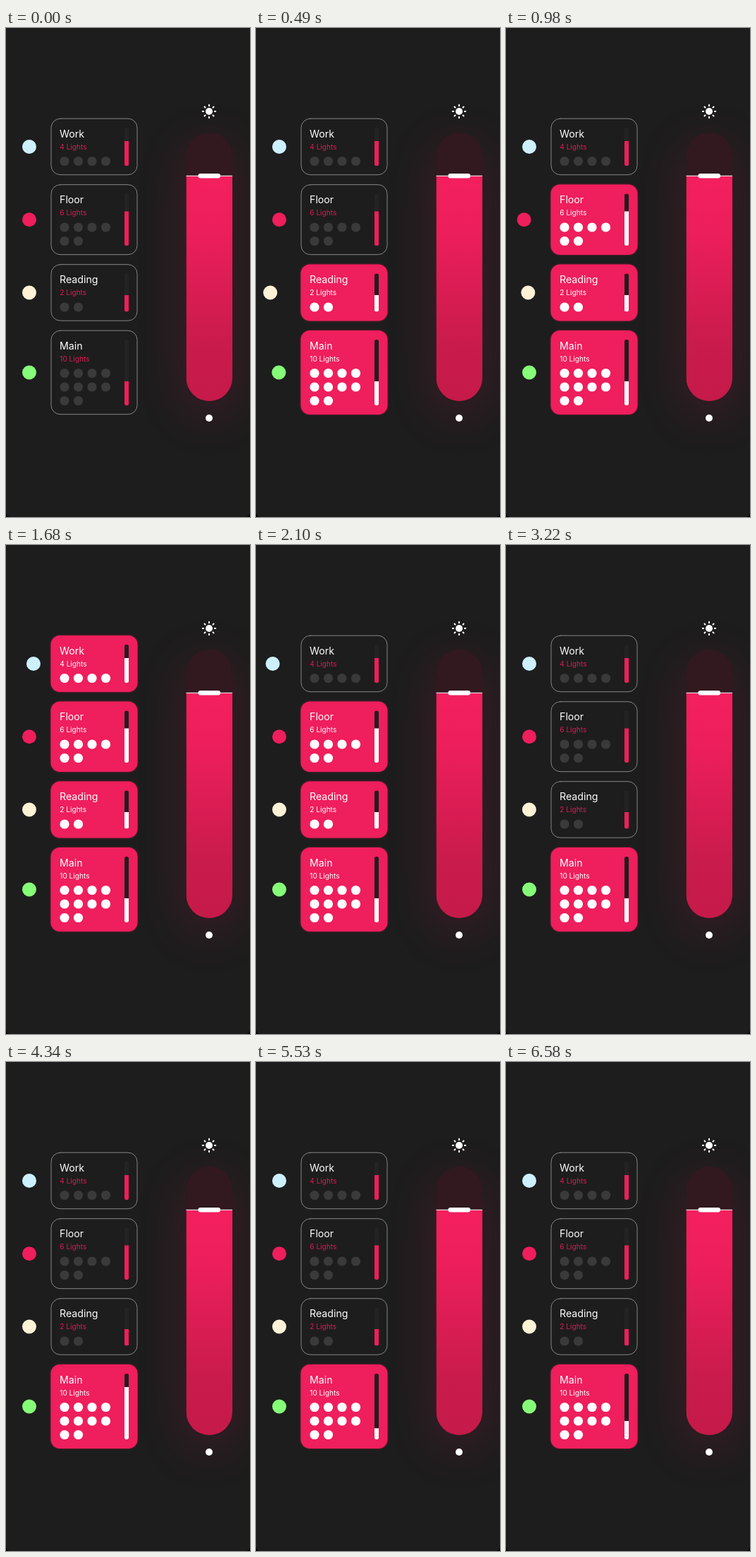
An HTML page with a canvas for the animation above (6.65 s loop, 346x692 px).

```html
<!DOCTYPE html>
<html lang="en">
<head>
<meta charset="utf-8">
<title>Light controls</title>
<style>
  html, body { margin: 0; width: 100%; height: 100%; overflow: hidden; background: #000; }
  canvas { display: block; width: 346px; height: 692px; }
</style>
</head>
<body>
<canvas id="stage"></canvas>
<script>
const W = 346, H = 692, LOOP = 6650, STEP = 70;
const BG = '#1d1d1d', PINK = '#ef1e5c', WHITE = '#fff';
const canvas = document.getElementById('stage');
const ctx = canvas.getContext('2d');
const dpr = window.devicePixelRatio || 1;
canvas.width = W * dpr;
canvas.height = H * dpr;
ctx.scale(dpr, dpr);

// on / off: tap times in ms
const cards = [
  { name: 'Work', lights: 4, top: 128, h: 80, level: 160, dot: '#cdf0ff', on: 1482, off: 2018 },
  { name: 'Floor', lights: 6, top: 221.5, h: 99.5, level: 259.5, dot: PINK, on: 890, off: 2444 },
  { name: 'Reading', lights: 2, top: 334.5, h: 80, level: 378, dot: '#fdf1d6', on: 438, off: 2870 },
  { name: 'Main', lights: 10, top: 428, h: 119, level: 500, dot: '#86fd78', on: 12, off: Infinity }
];

// Drag of the Main bar: [time, top edge]
const drag = [[3640, 500], [4340, 460], [4760, 460], [5390, 520], [5460, 520], [6160, 452], [6650, 511]];

function dragLevel(t) {
  if (t <= drag[0][0]) return drag[0][1];
  const i = drag.findIndex(p => p[0] >= t);
  const [t0, y0] = drag[i - 1], [t1, y1] = drag[i];
  const u = (t - t0) / (t1 - t0);
  return y0 + (y1 - y0) * (1 - Math.cos(Math.PI * u)) / 2;
}

// Damped shake after a tap
function shake(dt) {
  if (dt <= 0 || dt >= 690) return 0;
  return -16 * Math.exp(-dt / 250) * Math.sin(Math.PI * dt / 117);
}

function circle(x, y, r, color) {
  ctx.fillStyle = color;
  ctx.beginPath();
  ctx.arc(x, y, r, 0, 2 * Math.PI);
  ctx.fill();
}

function roundPath(x, y, w, h, r) {
  ctx.beginPath();
  ctx.roundRect(x, y, w, h, r);
}

function pill(x, y, w, h, r, color) {
  ctx.fillStyle = color;
  roundPath(x, y, w, h, r);
  ctx.fill();
}

function label(str, x, y, size, color) {
  ctx.font = `400 ${size}px Inter, sans-serif`;
  ctx.fillStyle = color;
  ctx.fillText(str, x, y);
}

function filledBar(x, y, w, h, r, level, back, front) {
  ctx.save();
  roundPath(x, y, w, h, r);
  ctx.clip();
  ctx.fillStyle = back;
  ctx.fillRect(x, y, w, h);
  ctx.fillStyle = front;
  ctx.fillRect(x, level, w, y + h - level);
  ctx.restore();
}

function drawCard(c, t) {
  const on = t > c.on && t <= c.off;
  const tap = t > c.off ? c.off : c.on;
  circle(33 + shake(t - tap), c.top + c.h / 2, 10, c.dot);

  if (on) {
    ctx.save();
    ctx.shadowColor = 'rgba(239,30,92,.5)';
    ctx.shadowBlur = 3 * dpr;
    pill(63.5, c.top, 123, c.h, 13, PINK);
    ctx.restore();
  } else {
    ctx.strokeStyle = '#858585';
    ctx.lineWidth = 1;
    roundPath(64, c.top + 0.2, 122, c.h - 0.5, 13);
    ctx.stroke();
  }

  label(c.name, 76, c.top + 26.5, 14.2, WHITE);
  label(c.lights + ' Lights', 76.3, c.top + 43.6, 10.1, on ? WHITE : '#d81c54');
  for (let i = 0; i < c.lights; i++) {
    const x = 83 + 19.5 * (i % 4), y = c.top + 60.5 + 19.5 * Math.floor(i / 4);
    circle(x, y, 6.6, on ? WHITE : '#3a3a3a');
  }

  const level = c.name === 'Main' ? dragLevel(t) : c.level;
  filledBar(168, c.top + 13, 6, c.h - 26, 2.5, level, on ? '#211b1d' : '#232323', on ? WHITE : PINK);
}

function drawSun(x, y) {
  circle(x, y, 5, WHITE);
  ctx.strokeStyle = WHITE;
  ctx.lineWidth = 2;
  ctx.lineCap = 'round';
  for (let i = 0; i < 8; i++) {
    const a = i * Math.PI / 4, cx = Math.cos(a), sy = Math.sin(a);
    ctx.beginPath();
    ctx.moveTo(x + 7.8 * cx, y + 7.8 * sy);
    ctx.lineTo(x + 9.2 * cx, y + 9.2 * sy);
    ctx.stroke();
  }
}

function drawSlider() {
  const x = 255.5, y = 148, w = 65.5, h = 380, r = 32.75, level = 209;
  ctx.save();
  ctx.shadowColor = 'rgba(240,30,92,.18)';
  ctx.shadowBlur = 70 * dpr;
  ctx.shadowOffsetY = 18 * dpr;
  pill(x, y, w, h, r, BG);
  ctx.restore();

  const grad = ctx.createLinearGradient(0, level, 0, y + h);
  grad.addColorStop(0, '#f41f5e');
  grad.addColorStop(0.25, '#ec1e5b');
  grad.addColorStop(0.75, '#c91b4c');
  grad.addColorStop(1, '#c51a4a');
  filledBar(x, y, w, h, r, level, '#31191f', grad);

  ctx.fillStyle = WHITE;
  ctx.fillRect(x, level - 0.2, w, 1);
  pill(272.5, 206, 31.5, 6.5, 3.2, WHITE);
  drawSun(288, 118);
  circle(288, 552, 5, WHITE);
}

function draw(t) {
  ctx.fillStyle = '#000';
  ctx.fillRect(0, 0, W, H);
  pill(0, 0, W, H, [0, 0, 6, 6], BG);
  drawSlider();
  cards.forEach(c => drawCard(c, t));
}

const start = performance.now();
function tick() {
  const t = (performance.now() - start) % LOOP;
  draw(Math.floor(t / STEP) * STEP);
  requestAnimationFrame(tick);
}
tick();
</script>
</body>
</html>
```
